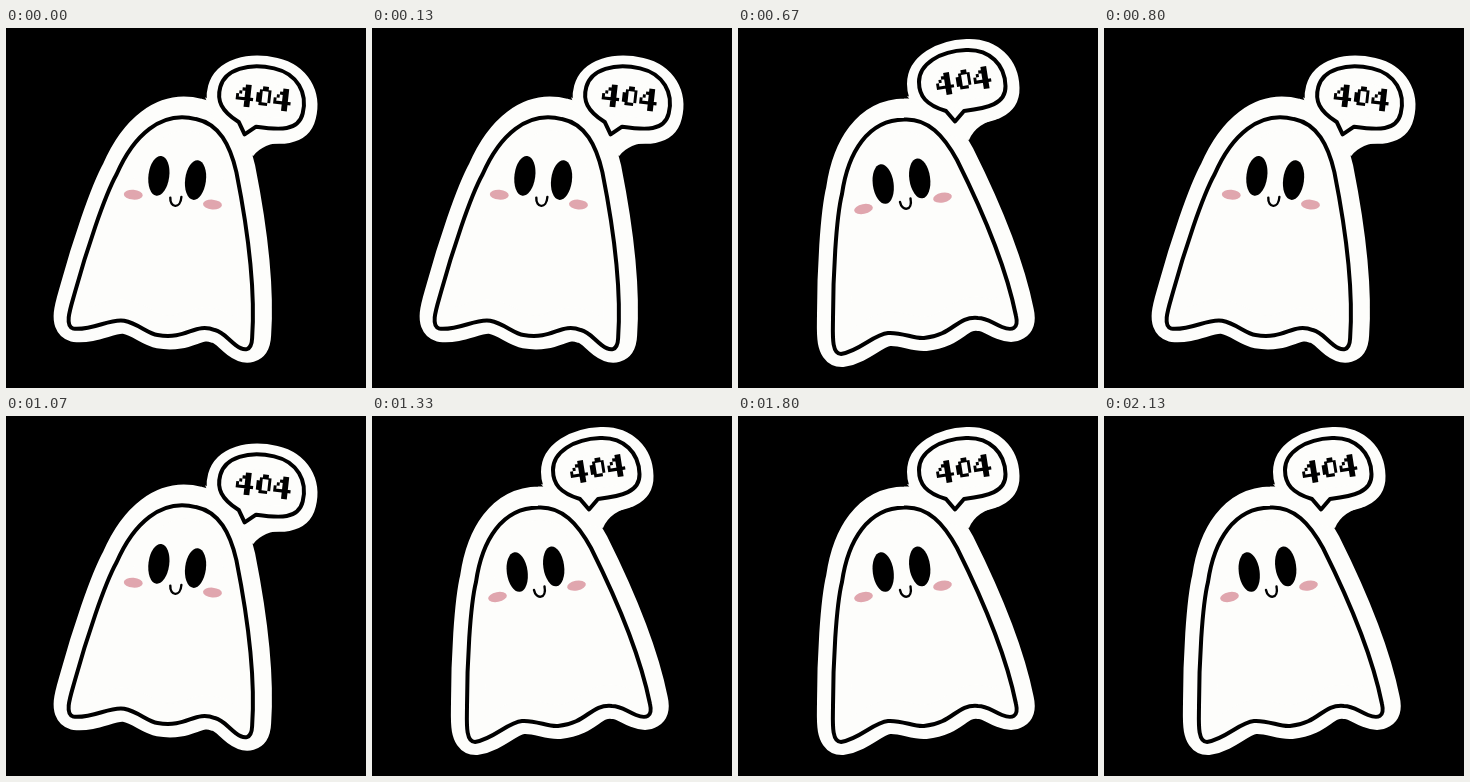
These frames come from a looping animation (360 px wide and 360 px high, 2190 ms). An HTML page:

```html
<!DOCTYPE html>
<html lang="en">
<head>
<meta charset="utf-8">
<title>404 ghost</title>
<style>
  html, body { margin: 0; width: 100%; height: 100%; overflow: hidden; background: #000; }
  svg { display: block; width: 100%; height: 100%; }
  .paper { fill: #fdfdfb; stroke: #fdfdfb; stroke-linejoin: round; }
  .ink { fill: none; stroke: #000; stroke-width: 4; stroke-linecap: round; stroke-linejoin: round; }
  .cheeks { fill: #e0a6ae; }
</style>
</head>
<body>
<svg viewBox="0 0 360 360">
  <defs>
    <path id="body" d="M166 91.5C190 90 206 108 219 132C242 178 268 238 278 288
      C281 301 274 303 264 299S249 290 240 290C218 288 216 307 186 310
      C176 311 164 304 150 305C136 306 122 323 103 326C93 326 95 305 95 290
      C95 250 98 190 104 166C110 124 130 92 166 91.5Z"/>
    <path id="bubble" d="M228 22C252 21 267 37 267.5 58C268 76 250 80 226 83
      L217 93.5L208 83C188 77 181 68 181 54C181 36 202 23 228 22Z"/>
    <path id="four" d="M3 0h2v7h-2zM2 1h1v1h-1zM1 2h1v1h-1zM0 3h1v1h-1zM0 4h6v1h-6z"/>
    <path id="zero" fill-rule="evenodd"
      d="M2 0h2v1h1v4h-1v1h-3v-1h-1v-3h1v-1h1zM2 1.5h2v3.5h-2z"/>
    <ellipse id="eye" rx="10.4" ry="20"/>
    <ellipse id="cheek" rx="9.5" ry="4.9"/>
  </defs>
  <g id="ghost">
    <!-- The sticker border is each outline again, drawn with a wide stroke. -->
    <g class="paper">
      <use href="#body" stroke-width="34" transform="translate(1 -4)"/>
      <use href="#bubble" stroke-width="26" transform="translate(1 2)"/>
      <path d="M169 68L262 90Q238 95 231 112L200 105Z" stroke="none"/>
    </g>
    <g class="ink">
      <use href="#body"/>
      <use href="#bubble"/>
      <path d="M162 174C164 184 175 183 172.500 170.500" style="stroke-width:2.4"/>
    </g>
    <use href="#eye" transform="translate(145.2 156) rotate(-8)"/>
    <use href="#eye" transform="translate(181.7 150.4) rotate(-8)"/>
    <g class="cheeks">
      <use href="#cheek" transform="translate(125.5 181) rotate(-11)"/>
      <use href="#cheek" transform="translate(204.5 169.6) rotate(-11)"/>
    </g>
    <g role="img" aria-label="404"
       transform="translate(225.5 53) rotate(-9) scale(2.9 3.2) translate(-9.5 -3.5)">
      <use href="#four"/>
      <use href="#zero" x="7"/>
      <use href="#four" x="13"/>
    </g>
  </g>
</svg>
<script>
const LOOP = 2190;
const flips = [470, 800, 1130, 1470, 1800];
const leanRight = 'rotate(15.3 183.4 208.6) translate(-7.3 2)';
const ghost = document.getElementById('ghost');

function draw(t) {
  const leansLeft = flips.filter(flip => t >= flip).length % 2;
  ghost.setAttribute('transform', leansLeft ? '' : leanRight);
}

const start = performance.now();
function tick() {
  draw((performance.now() - start) % LOOP);
  requestAnimationFrame(tick);
}
tick();
</script>
</body>
</html>
```
